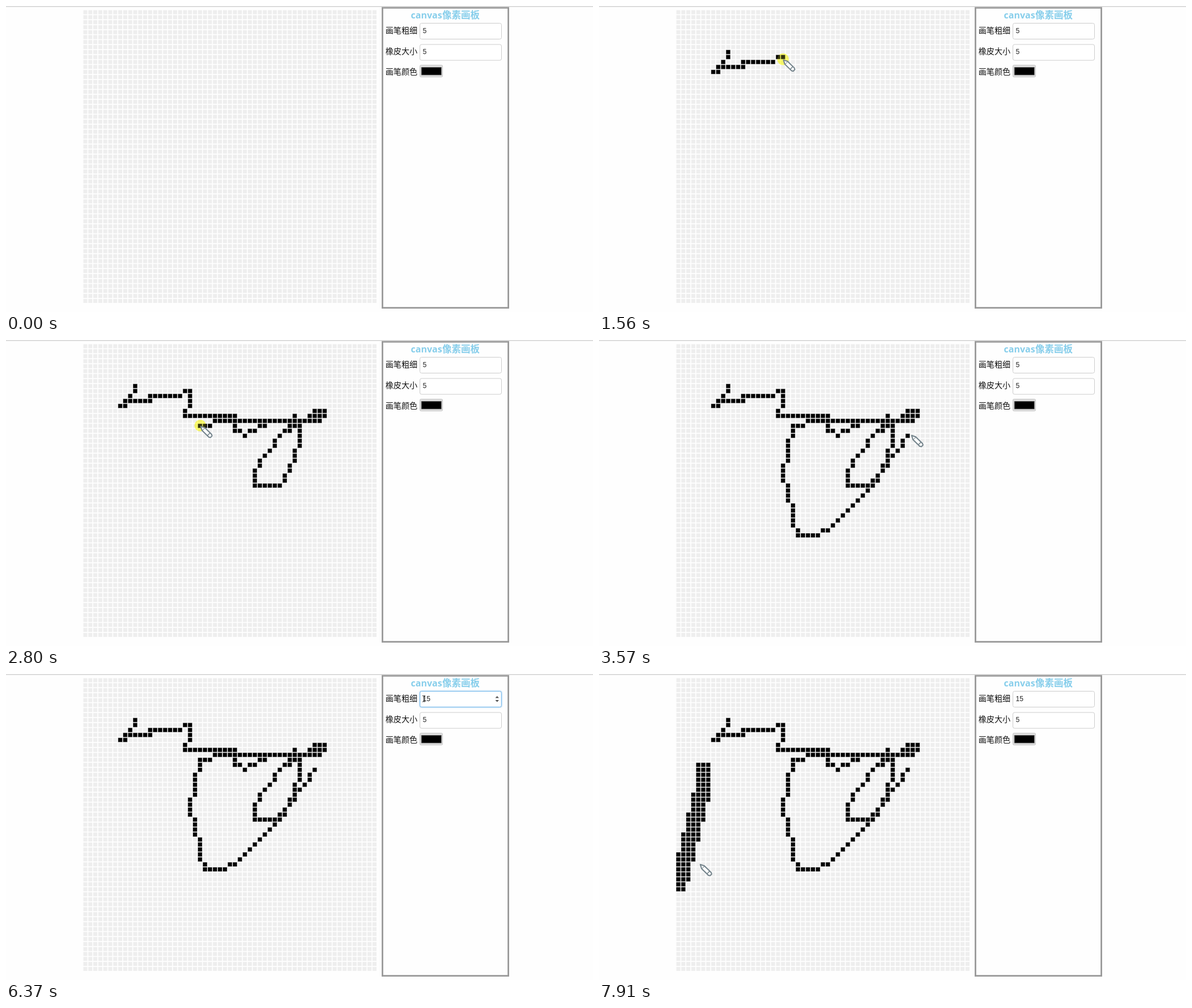
Recreate the animation shown at these times as an HTML page with a canvas. Size 1036 px wide and 541 px high, loop 7.99 s.

```html
<!DOCTYPE html>
<html lang="zh">
<head>
<meta charset="utf-8">
<title>canvas像素画板</title>
<style>
html, body { margin: 0; width: 100%; height: 100%; overflow: hidden; background: #fefefe; }
canvas { display: block; }
</style>
</head>
<body>
<canvas id="stage" width="1036" height="541"></canvas>
<script>
const ctx = document.getElementById('stage').getContext('2d');
const LOOP = 7990, START = 140, TICK = 77.7;
const PITCH = 8.8, CELL = 7.04, COUNT = 59;
const CJK = '"Noto Sans CJK SC", "Noto Sans CJK JP", "Noto Sans CJK", sans-serif';
const ARIAL = '12.2px "Liberation Sans", sans-serif';
const cellX = c => 140 + PITCH * c;
const cellY = r => 11 + PITCH * r;
const lerp = (a, b, p) => a + (b - a) * p;
const mix = (a, b, p) => [lerp(a[0], b[0], p), lerp(a[1], b[1], p)];
const within = (k, a, b) => k >= a && k <= b;
const parse = path => path.split(' ').map(p => p.split(',').map(Number));

// A stroke walks straight lines between grid points, one cell per step.
function stroke(from, to, path, radius = 0) {
  const pts = parse(path), steps = [pts[0]];
  for (let i = 1; i < pts.length; i++) {
    const a = pts[i - 1], b = pts[i];
    const n = Math.ceil(Math.max(Math.abs(b[0] - a[0]), Math.abs(b[1] - a[1])));
    for (let j = 1; j <= n; j++) steps.push(mix(a, b, j / n));
  }
  const at = u => {
    const f = u * (steps.length - 1);
    const [c, r] = mix(steps[Math.floor(f)], steps[Math.ceil(f)], f % 1);
    return [cellX(c), cellY(r)];
  };
  return { from, to, at, steps, radius };
}

// A move follows a curve through the air and slows down as it arrives.
function move(from, to, path) {
  const [a, bend, b] = parse(path);
  const at = u => {
    const p = 1 - (1 - u) ** 3;
    return mix(mix(a, bend, p), mix(bend, b, p), p);
  };
  return { from, to, at };
}

const acts = [
  move(0, 10, '654,392 330,-60 226,85'),
  stroke(13, 23, '10.4,8 7,12 8.4,11 13,11 13.4,10 19,10 20,9 21,9 21,12 19.9,14 30,14 30,17 32,17.9'),
  stroke(23, 24.02, '32,17.9 38,14.9 41.4,15 42.3,14.4'),
  stroke(24.02, 34, '42.3,14.4 44,15 46,13 48,13 48,14 45,14 47,15 42,15 42,16 39.9,17 34,25 34,28 39,28 41.4,24 42.4,21 43,16 42,15 26,15.4 23,16.2'),
  stroke(34, 43.5, '23.05,16 21.3,24 21.4,27 23.9,38 28,38 31,36 38,29 46,18'),
  move(44, 52, '551,168 740,140 754,46.5'),
  move(65, 70, '754,46.5 746,45 737.5,43.5'),
  move(80, 90.9, '737.5,43.5 20,350 184,168'),
  stroke(91, 98, '5,18 4.5,23 0,41', 1),
  move(99.2, 100, '140,372 160,350 178,336')
];
const strokes = acts.filter(a => a.steps);

function rect(x, y, w, h, color) {
  ctx.fillStyle = color;
  ctx.fillRect(x, y, w, h);
}

function text(str, x, y, font, color) {
  ctx.font = font;
  ctx.fillStyle = color;
  ctx.fillText(str, x, y);
}

function shape(path, fill, line, width) {
  ctx.beginPath();
  parse(path).forEach(p => ctx.lineTo(p[0], p[1]));
  if (fill) { ctx.closePath(); ctx.fillStyle = fill; ctx.fill(); }
  if (line) { ctx.strokeStyle = line; ctx.lineWidth = width; ctx.stroke(); }
}

function box(x, y, w, h, r, fill, line) {
  ctx.beginPath();
  ctx.roundRect(x, y, w, h, r);
  ctx.fillStyle = fill;
  ctx.fill();
  ctx.strokeStyle = line;
  ctx.lineWidth = 1;
  ctx.stroke();
}

const square = (c, r, size, color) =>
  rect(cellX(c) - size / 2, cellY(r) - size / 2, size, size, color);

function drawGrid(k) {
  for (let r = 0; r < COUNT; r++)
    for (let c = 0; c < COUNT; c++) square(c, r, CELL, '#eeeeee');

  const inked = new Set();
  for (const s of strokes) {
    const size = k > s.from ? s.radius : 0;
    s.steps.forEach(([x, y], i) => {
      if (lerp(s.from, s.to, i / (s.steps.length - 1)) > k) return;
      for (let dy = -size; dy <= size; dy++)
        for (let dx = -size; dx <= size; dx++) {
          const c = Math.round(x) + dx;
          if (c >= 0) inked.add(c + COUNT * (Math.round(y) + dy));
        }
    });
  }
  // Ink has a soft gray rim.
  for (const id of inked) {
    const c = id % COUNT, r = Math.floor(id / COUNT);
    square(c, r, 8, 'rgba(0,0,0,.4)');
    square(c, r, 6.9, '#000');
  }
}

function drawPanel(k) {
  ctx.strokeStyle = '#999999';
  ctx.lineWidth = 2.8;
  ctx.strokeRect(664.4, 3.2, 222.2, 530.4);
  text('canvas', 714.6, 22, 'bold 16px "Open Sans", "Noto Sans", sans-serif', '#87ceeb');
  text('像素画板', 770, 22, 'bold 16.5px ' + CJK, '#87ceeb');
  ['画笔粗细', '橡皮大小', '画笔颜色'].forEach((s, i) =>
    text(s, 669.7, 48 + 36.7 * i, '14.1px ' + CJK, '#111'));

  box(730.5, 30.5, 144, 28, 3, '#fff', '#cccccc');
  const focus = Math.max(0, Math.min(1, (k - 59) / 3, (94 - k) / 3));
  if (focus) {
    ctx.save();
    ctx.globalAlpha = focus;
    ctx.shadowColor = 'rgba(102,175,233,.5)';
    ctx.shadowBlur = 3;
    box(730.5, 30.5, 144, 28, 3, '#fff', '#74b8ec');
    ctx.restore();
  }
  box(730.5, 68, 144, 28, 3, '#fff', '#cccccc');
  text('5', 735.4, 85.2, ARIAL, '#222');

  const selected = within(k, 68, 76);
  if (selected) rect(735.5, 37, 6.8, 14, '#3390ff');
  text(k < 77 ? '5' : k < 78 ? '1' : '15', 735.4, 48, ARIAL, selected ? '#fff' : '#222');
  if (within(k, 60, 67)) rect(741.4, 37.5, 1, 13, '#000');
  if (within(k, 48, 90)) {
    shape('863.5,42.5 866.8,39 870,42.5', '#505050');
    shape('863.5,46 866.8,49.5 870,46', '#505050');
  }

  box(730.5, 104.5, 40, 21, 2, '#e1e1e1', '#c4c4c4');
  rect(732.7, 107.9, 36.2, 14.6, '#777');
  rect(733.6, 108.8, 34.4, 12.8, '#000');
}

function drawCursor(x, y) {
  ctx.save();
  ctx.translate(x, y);
  if (x < 660) {
    ctx.lineJoin = 'round';
    shape('0.8,0.8 8,3.2 20,15 20.8,17.8 18,20.6 15.2,20 3,8', '#fbfcfc', '#72828a', 2);
    shape('8,3.2 6.2,6.2 3,8', null, '#72828a', 1);
    shape('17.3,12.5 12.6,17.3', null, '#72828a', 1.5);
  } else if (x > 730 && y < 59) {
    rect(-0.5, -5, 1, 10.5, '#222');
    for (const sx of [-2.5, 0.5])
      for (const sy of [-5.5, 5]) rect(sx, sy, 2, 1, '#222');
  } else {
    shape('0,0 0,14 3.2,11 5.4,16 7.4,15 5.3,10.3 9.8,10', '#fff', '#000', 1);
  }
  ctx.restore();
}

function drawPointer(k) {
  const typing = within(k, 77, 79);
  if (k < 0 || typing) return;
  const act = acts.filter(a => a.from <= k).pop();
  const [x, y] = act.at(Math.min(1, (k - act.from) / (act.to - act.from)));
  const clicking = within(k, 60, 61), selecting = within(k, 65, 71);
  if (act.steps || clicking || selecting) {
    ctx.beginPath();
    ctx.arc(x, y - 0.5, 10.3, 0, 7);
    ctx.globalCompositeOperation = 'multiply';
    ctx.fillStyle = '#ffff7c';
    ctx.fill();
    ctx.globalCompositeOperation = 'source-over';
    ctx.fillStyle = 'rgba(255,255,60,.2)';
    ctx.fill();
  }
  drawCursor(x, y);
}

function draw(k) {
  rect(0, 0, 1036, 541, '#fefefe');
  rect(0, 0, 1036, 1.7, '#d8d8d8');
  drawGrid(k);
  drawPanel(k);
  drawPointer(k);
}

let shown = null;
const begin = performance.now();
function tick() {
  const t = (performance.now() - begin) % LOOP;
  const k = Math.min(100, Math.floor((t - START + 12) / TICK));
  if (k !== shown) draw(shown = k);
  requestAnimationFrame(tick);
}
tick();
</script>
</body>
</html>
```
